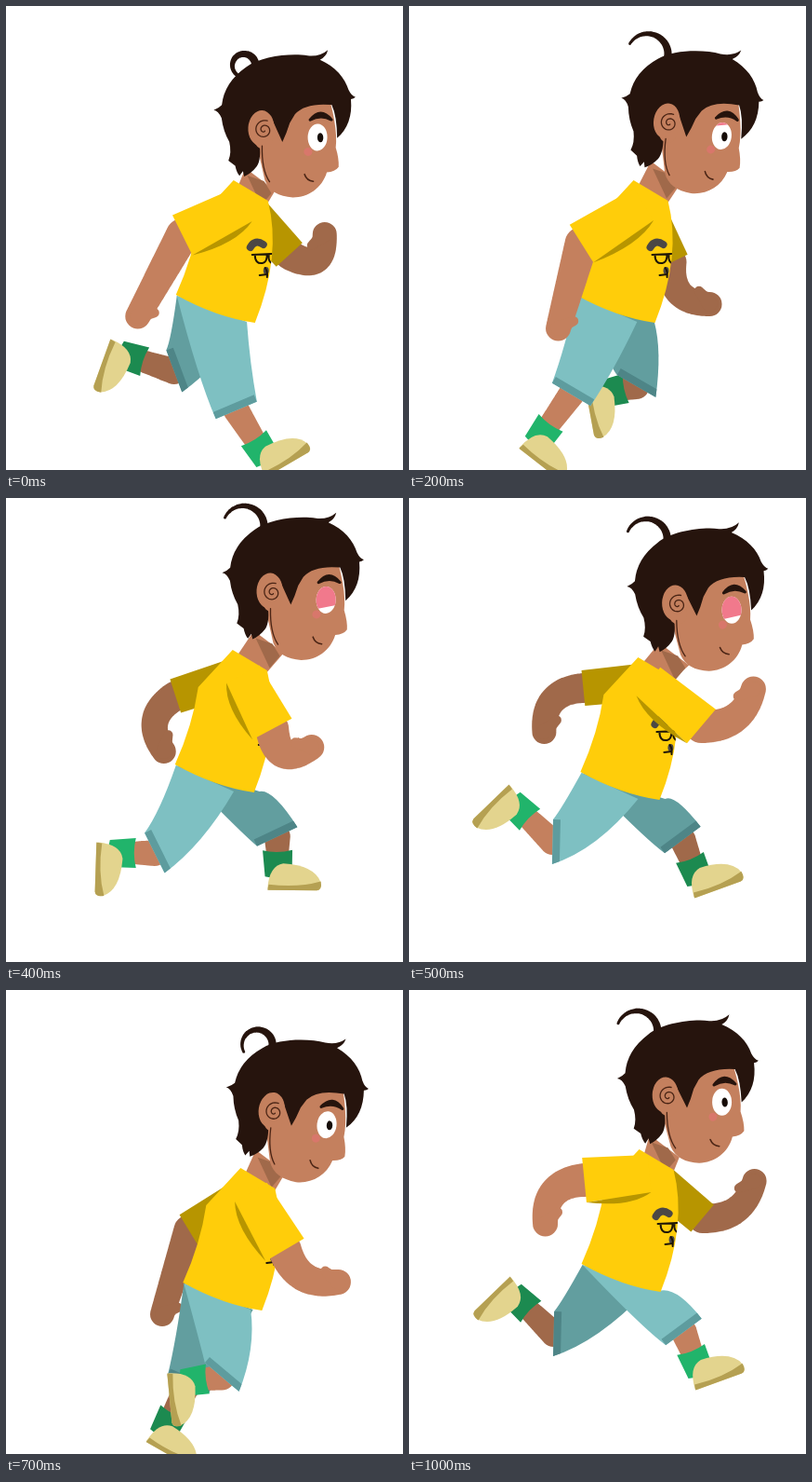
These frames come from a looping animation (427x498 px, 1.1 s). An HTML page with a canvas:

```html
<!DOCTYPE html>
<html lang="en">
<head>
<meta charset="utf-8">
<title>Running boy</title>
<style>
html, body { margin: 0; width: 100%; height: 100%; overflow: hidden; background: #fff; }
canvas { display: block; width: 427px; height: 498px; }
</style>
</head>
<body>
<canvas id="stage"></canvas>
<script>
const W = 427, H = 498, STEP = 100, STEPS = 11, CYCLE = 12;
const canvas = document.getElementById('stage');
const ctx = canvas.getContext('2d');
const dpr = window.devicePixelRatio || 1;
canvas.width = W * dpr;
canvas.height = H * dpr;

const SKIN = '#c4805e', SKIN_DARK = '#a0694a', HAIR = '#26140d', LINE = '#4a2415';
const SHIRT = '#ffcd0a', SHIRT_DARK = '#b79500';

// Both sides share one stride; the far side runs half a cycle ahead.
const near = {
  shift: 0, skin: SKIN, pants: '#7ec0c2', band: '#5e9c9e', sock: '#21b46b',
  shirt: SHIRT, sleeve: 24, arm: [18, 13.5], hip: 30
};
const far = {
  shift: CYCLE / 2, skin: SKIN_DARK, pants: '#629e9f', band: '#4e8587', sock: '#1c8a50',
  shirt: SHIRT_DARK, sleeve: 19, arm: [16, 13], hip: 38
};

// Key poses of one arm and leg, measured from the middle of the shirt hem.
const stride = [
  { at: 0, ankle: [47, 149], cuff: [22, 109], sleeve: [-36, -79], hand: [-84, 8] },
  { at: 2, ankle: [-77, 132], cuff: [-48, 92], sleeve: [-37, -70], hand: [-62, 21] },
  { at: 3, ankle: [-88, 132], cuff: [-57, 100], sleeve: [36, -42], hand: [65, 37] },
  { at: 5, ankle: [-106, 28], cuff: [-73, 60], sleeve: [87, -64], hand: [143, -104] },
  { at: 6, ankle: [-88, 53], cuff: [-45, 67], sleeve: [79, -58], hand: [117, -80] },
  { at: 7, ankle: [-92, 95], cuff: [-55, 95], sleeve: [82, -50], hand: [178, -40] },
  { at: 8, ankle: [-1, 88], cuff: [22, 83], sleeve: [60, -50], hand: [101, -5] },
  { at: 9, ankle: [56, 90], cuff: [67, 67], sleeve: [-45, -72], hand: [-28, 0] },
  { at: 11, ankle: [79, 88], cuff: [67, 58], sleeve: [-40, -105], hand: [-82, -58] }
];
const HIP = [-5, 0], HIP_BACK = [-42, -14], SHOULDER = [30, -112], ARM = 88;

const art = {
  torso: 'M19 -138L56 -116Q71 -57 42 15Q0 9 -43 -15Q-24 -57 -18 -98Z',
  shoe: 'M-28 11Q-27 -13 -12 -16Q22 -15 29 3Q31 11 25 12L-27 13Z',
  sole: 'M-28 13L-27 7Q4 10 29 2Q31 11 25 12Z',
  sock: 'M-12 -16Q-8 0 -12 16L16 14Q20 0 16 -15Z',
  hair: 'M-14 -67C2 -78 35 -80 53 -76Q66 -74 75 -81Q73 -74 66 -71C82 -63 92 -50 95 -37' +
    'Q98 -30 102 -29Q100 -27 97 -27Q98 0 80 14Q81 -10 76 -22Q48 -26 36 -14L30 -5Q26 6 21 15' +
    'L12 -8L-4 12Q-2 32 -8 40Q-14 47 -22 50L-23 44L-27 49Q-30 45 -31 38L-38 32Q-34 24 -36 12' +
    'Q-42 0 -43 -14Q-46 -22 -51 -23Q-45 -25 -42 -28Q-38 -52 -14 -67Z',
  face: 'M0 -45L70 -45Q82 0 78 24Q81 36 80 45Q76 50 67 50C61 67 45 76 29 75C14 73 4 67 0 55L-6 20Z',
  jaw: 'M-1 18Q-3 44 5 57',
  mouth: 'M43 51Q45 58 52 59',
  brow: 'M52 -7Q64 -21 75 -6Q64 -13 52 -7Z',
  glasses: 'M-11 -4L10 -5M-8 -4Q-8 6 0 5Q5 4 5 -4M7 -4Q6 3 10 5M-3 18L5 17M3 10Q6 14 5 20',
  printBrow: 'M-13 -12Q-8 -21 1 -15'
};
for (const k in art) art[k] = new Path2D(art[k]);

const mix = (a, b, t) => a + (b - a) * t;
const lerp = (a, b, t) => a.map((v, i) => mix(v, b[i], t));
const add = (a, b, s = 1) => [a[0] + b[0] * s, a[1] + b[1] * s];
const sub = (a, b) => add(a, b, -1);
const unit = v => v.map(c => c / (Math.hypot(...v) || 1));
const turned = v => [-v[1], v[0]];
const wave = (phase, period, peak) => Math.cos((phase - peak) / period * 2 * Math.PI);

// Triangular pulse around a phase, wrapping at the end of the cycle.
function pulse(phase, peak, width) {
  const d = Math.abs(phase - peak);
  return Math.max(0, 1 - Math.min(d, CYCLE - d) / width);
}

function limbs(phase) {
  const p = phase % CYCLE;
  const i = stride.findLastIndex(k => k.at <= p);
  const a = stride[i], b = stride[(i + 1) % stride.length];
  const t = (p - a.at) / ((b.at || CYCLE) - a.at);
  const pose = {};
  for (const k of ['ankle', 'cuff', 'sleeve', 'hand']) pose[k] = lerp(a[k], b[k], t);
  return pose;
}

function fill(path, color) {
  ctx.fillStyle = color;
  ctx.fill(path);
}

function stroke(path, color, width) {
  ctx.strokeStyle = color;
  ctx.lineWidth = width;
  ctx.lineCap = ctx.lineJoin = 'round';
  ctx.stroke(path);
}

function poly(points, color) {
  const path = new Path2D();
  for (const p of points) path.lineTo(...p);
  path.closePath();
  fill(path, color);
}

function oval(x, y, rx, ry, color, tilt = 0) {
  const path = new Path2D();
  path.ellipse(x, y, rx, ry, tilt, 0, 7);
  fill(path, color);
}

function placed([x, y], angle, draw) {
  ctx.save();
  ctx.translate(x, y);
  ctx.rotate(angle);
  draw();
  ctx.restore();
}

// Tapered line made of overlapping discs along a curve.
function taper(point, r0, r1, color) {
  const path = new Path2D();
  for (let i = 0; i <= 60; i++) {
    const [x, y] = point(i / 60), r = mix(r0, r1, i / 60);
    path.moveTo(x + r, y);
    path.arc(x, y, r, 0, 7);
  }
  fill(path, color);
}

const bend = (a, b, c) => t => lerp(lerp(a, b, t), lerp(b, c, t), t);
const line = (a, b) => t => lerp(a, b, t);

function drawArm(side, phase) {
  const { sleeve, hand } = limbs(phase + side.shift);
  const reach = sub(hand, sleeve);
  const slack = Math.sqrt(Math.max(0, ARM ** 2 - Math.hypot(...reach) ** 2)) / 2;
  const elbow = add(lerp(sleeve, hand, .5), turned(unit(reach)), slack);
  taper(bend(sleeve, elbow, hand), ...side.arm, side.skin);
  const fore = unit(sub(hand, elbow));
  taper(line(hand, add(add(hand, fore, -12), turned(fore), -14)), 8, 5, side.skin);

  const dir = unit(sub(sleeve, SHOULDER));
  const under = turned(dir).map(c => c * (dir[0] < 0 ? -1 : 1));
  const corner = add(sleeve, under, side.sleeve), pit = add(SHOULDER, under, 20);
  poly([add(SHOULDER, under, -20), add(sleeve, under, -side.sleeve), corner, pit], side.shirt);
  if (side === near) {
    const fold = new Path2D();
    fold.moveTo(...corner);
    fold.quadraticCurveTo(...add(lerp(corner, pit, .65), under, 13), ...pit);
    fill(fold, SHIRT_DARK);
  }
}

function drawLeg(side, phase) {
  const { ankle, cuff } = limbs(phase + side.shift);
  const thigh = unit(sub(cuff, HIP)), shin = unit(sub(ankle, cuff));
  const angle = Math.atan2(shin[1], shin[0]);
  taper(line(cuff, ankle), 14, 11, side.skin);
  placed(ankle, angle, () => fill(art.sock, side.sock));
  placed(ankle, angle - 1.52, () => {
    ctx.translate(18, 18);
    fill(art.shoe, '#e3d48e');
    fill(art.sole, '#b5a052');
  });

  const middle = lerp(HIP, cuff, .5), knee = add(cuff, shin, -26);
  const pull = lerp(middle, knee, .35);
  const out = turned(thigh), down = unit(add(thigh, shin)), across = turned(down);
  const front = add(cuff, across, -24), back = add(cuff, across, 24);
  const pants = new Path2D();
  pants.moveTo(side.hip + .15 * cuff[0], 14);
  pants.quadraticCurveTo(...add(pull, out, -29), ...front);
  pants.lineTo(...back);
  pants.quadraticCurveTo(...add(pull, out, 29), ...HIP_BACK);
  pants.closePath();
  fill(pants, side.pants);
  ctx.save();
  ctx.clip(pants);
  poly([front, back, add(back, down, -8), add(front, down, -8)], side.band);
  ctx.restore();
}

function drawShirt() {
  fill(art.torso, SHIRT);
  ctx.save();
  ctx.clip(art.torso);
  ctx.translate(50, -54);
  stroke(art.printBrow, '#4b4745', 8);
  oval(4, 13, 3, 4, '#4b4745');
  stroke(art.glasses, '#1d1508', 2);
  ctx.restore();
}

function drawNeck(ear) {
  poly([add(ear, [-18, 42]), [24, -132], [56, -114], add(ear, [14, 66])], SKIN);
  poly([[-16, 50], [2, 56], [10, 69], [-1, 82]].map(p => add(ear, p)), SKIN_DARK);
}

function drawEye(lid) {
  ctx.save();
  ctx.beginPath();
  ctx.ellipse(59, 12, 10.5, 14.5, .08, 0, 7);
  ctx.clip();
  ctx.fillStyle = '#fff';
  ctx.fillRect(40, -10, 40, 40);
  oval(62, 12.5, 3.2, 5, '#160c08');
  const y = -2 + 28 * lid;
  if (lid) poly([[40, -8], [76, -8], [76, y - 2], [40, y + 3]], '#f1798c');
  ctx.restore();
}

function drawEar() {
  oval(-1, -1, 14, 19, SKIN, .12);
  oval(1, 11, 10, 11, SKIN);
  const spiral = new Path2D();
  for (let a = 0; a < 10.5; a += .2) {
    const r = 1.5 + a * .85;
    spiral.lineTo(2 + r * Math.cos(a + 1), 1 + r * Math.sin(a + 1));
  }
  stroke(spiral, LINE, 1.3);
}

// Loose strand: a line of fixed length that coils up twice per cycle.
function drawStrand(phase) {
  const turn = 2.9 + 2.25 * (pulse(phase, 0, 1) + pulse(phase, 8.8, 2));
  const r = 64 / turn, start = .25;
  taper(t => [
    -4 + r * (Math.cos(start - turn * t) - Math.cos(start)),
    -66 + r * (Math.sin(start - turn * t) - Math.sin(start))
  ], 4.5, 1.5, HAIR);
}

function drawHead(ear, phase) {
  const tilt = (4 * wave(phase, 6, 2) - 1) * Math.PI / 180;
  const lid = .93 * pulse(phase, 4.5, 2.7);
  placed(ear, tilt, () => {
    fill(art.face, SKIN);
    drawStrand(phase);
    fill(art.hair, HAIR);
    drawEar();
    stroke(art.jaw, LINE, 1.3);
    stroke(art.mouth, LINE, 1.6);
    oval(48, 27, 4.5, 4.5, '#d8776b');
    drawEye(lid);
    fill(art.brow, HAIR);
    stroke(art.brow, HAIR, 3);
  });
}

function draw(phase) {
  ctx.setTransform(dpr, 0, 0, dpr, 0, 0);
  ctx.fillStyle = '#fff';
  ctx.fillRect(0, 0, W, H);
  ctx.translate(228 - 5.5 * wave(phase, CYCLE, 2.2), 317 + 16 * wave(phase, 6, 1));
  const ear = [54 + 6 * wave(phase, CYCLE, 4.5), -198 + 5 * wave(phase, 6, 0)];
  drawArm(far, phase);
  drawLeg(far, phase);
  drawLeg(near, phase);
  drawNeck(ear);
  drawShirt();
  drawArm(near, phase);
  drawHead(ear, phase);
}

// The second half of the run has one step fewer, so it moves a little faster.
const phaseAt = step => step < 6 ? step : 6.6 + (step - 6) * 1.1;

const start = performance.now();
function tick() {
  draw(phaseAt(Math.floor((performance.now() - start) / STEP) % STEPS));
  requestAnimationFrame(tick);
}
tick();
</script>
</body>
</html>
```
